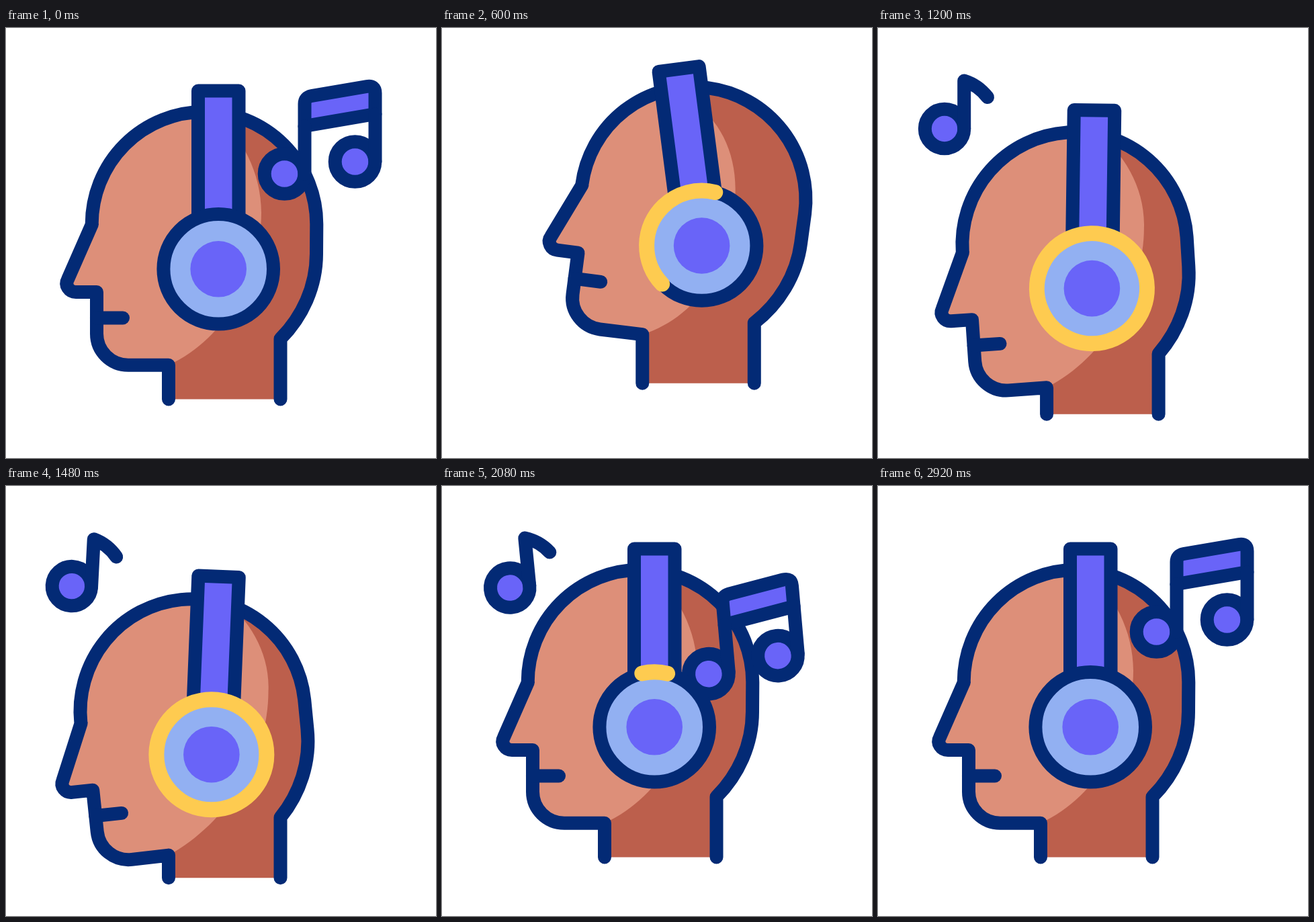
Animation, 640 px wide and 640 px high, one loop 3 s. Source, as an HTML page with a canvas:

```html
<!DOCTYPE html>
<html lang="en">
<head>
<meta charset="utf-8">
<title>Listening to music</title>
<style>
html, body { margin: 0; width: 100%; height: 100%; overflow: hidden; background: #fff; }
canvas { display: block; width: 100vw; height: 100vh; }
</style>
</head>
<body>
<canvas id="stage" width="640" height="640"></canvas>
<script>
const ctx = document.getElementById('stage').getContext('2d');
const LOOP = 3000, STEP = 40, TAU = Math.PI * 2, DEG = Math.PI / 180;
const NAVY = '#032a75', PURPLE = '#6964f8', BLUE = '#92b0f2', YELLOW = '#fecb50';
const SKIN = '#dd8f79', SHADE = '#bc5f4c';
const PIVOT = { x: 408.5, y: 462.6 };
const EAR = { x: 316.2, y: 358.8 };

const smooth = u => u * u * (3 - 2 * u);
const linear = u => u;

// Smooth start with a longer tail: cubic-bezier(.33, 0, .3, 1).
function settle(x) {
  let lo = 0, hi = 1;
  for (let i = 0; i < 24; i++) {
    const s = (lo + hi) / 2, r = 1 - s;
    if (0.99 * s * r * r + 0.9 * s * s * r + s ** 3 < x) lo = s; else hi = s;
  }
  return smooth(lo);
}

const span = (t, from, to, ease = smooth) => ease(Math.min(1, Math.max(0, (t - from) / (to - from))));

// Interpolates keys of the form [time, value, value, ...].
function track(t, keys, ease = smooth) {
  if (t <= keys[0][0]) return keys[0].slice(1);
  for (let i = 1; i < keys.length; i++) {
    const a = keys[i - 1], b = keys[i];
    if (t <= b[0]) {
      const p = span(t, a[0], b[0], ease);
      return a.slice(1).map((v, k) => v + (b[k + 1] - v) * p);
    }
  }
  return keys[keys.length - 1].slice(1);
}

const headKeys = [
  [245, 0, 0, 0, 0], [752, 61, -25.8, 8, -8], [872, 61, -25.8, 8, -8],
  [1416, 0, 30.7, -6, 2.3], [1551, 0, 30.7, -6, 2.3], [2029, 0, 0, 0, 0]
];
const singleSwing = [[500, 0], [840, -8], [900, -8], [1200, 0], [1480, 3], [1760, 0], [2080, -5.6], [2400, 0]];
const pairSwing = [[1780, 0], [2080, -5], [2360, 4], [2640, -5], [2900, 0]];
const ringTurn = [[320, 100], [400, 110], [880, 172.4], [1760, 249.8], [2080, 283.7], [2190, 295]];

function stroke(color = NAVY, width = 20) {
  ctx.strokeStyle = color;
  ctx.lineWidth = width;
  ctx.stroke();
}

function disc(x, y, r, fill, outlined) {
  ctx.beginPath();
  ctx.arc(x, y, r, 0, TAU);
  ctx.fillStyle = fill;
  ctx.fill();
  if (outlined) stroke();
}

function drawHead([dx, dy, angle]) {
  const c = Math.cos(angle * DEG), s = Math.sin(angle * DEG);
  const turn = (x, y) => {
    x -= PIVOT.x; y -= PIVOT.y;
    return [PIVOT.x + dx + x * c - y * s, PIVOT.y + dy + x * s + y * c];
  };
  const neckX = 242 + dx, chinY = turn(242, 501.7)[1], bottom = 552.5 + dy;
  const line = (x, y) => ctx.lineTo(...turn(x, y));
  const curve = (x1, y1, x2, y2, x, y) =>
    ctx.bezierCurveTo(...turn(x1, y1), ...turn(x2, y2), ...turn(x, y));

  const outlinePath = () => {
    ctx.beginPath();
    ctx.moveTo(neckX, bottom);
    ctx.lineTo(neckX, chinY);
    line(182, 501.7);
    curve(156, 501.7, 135, 481, 135, 455);
    line(135, 393);
    line(104, 393);
    curve(94, 393, 87, 383, 92, 374);
    line(128, 292);
    const [cx, cy] = turn(295, 292);
    ctx.arc(cx, cy, 167.3, Math.PI + angle * DEG, TAU + angle * DEG);
    line(462, 336);
    curve(462, 385, 441, 430, PIVOT.x, PIVOT.y);
    ctx.lineTo(PIVOT.x + dx, bottom);
  };

  ctx.save();
  outlinePath();
  ctx.fillStyle = SHADE;
  ctx.fill();
  ctx.clip();

  // The shadow edge follows the head but swells a little as it tilts.
  const tilt = Math.abs(angle), nod = Math.max(0, -angle);
  const bulge = 380 + dx + 1.75 * nod;
  ctx.beginPath();
  ctx.moveTo(0, 0);
  ctx.lineTo(312 + dx, 0);
  ctx.lineTo(312 + dx, 130 + dy);
  ctx.bezierCurveTo(350 + dx + 1.3 * tilt, 160 + dy, bulge + 0.5 * tilt, 215 + dy, bulge, 275 + dy);
  ctx.bezierCurveTo(bulge, 360 + dy + 2 * nod, ...turn(330, 462), neckX, chinY);
  ctx.lineTo(neckX, 640);
  ctx.lineTo(0, 640);
  ctx.fillStyle = SKIN;
  ctx.fill();
  ctx.restore();

  outlinePath();
  stroke();
  ctx.beginPath();
  ctx.moveTo(...turn(135, 431.5));
  line(174, 431.5);
  stroke();
  return turn(EAR.x, EAR.y);
}

function drawHeadphones([x, y], tilt, t) {
  ctx.save();
  ctx.translate(x, y);
  ctx.save();
  ctx.rotate(tilt * DEG);
  ctx.beginPath();
  ctx.rect(-30.2, -265.2, 60.5, 220);
  ctx.fillStyle = PURPLE;
  ctx.fill();
  stroke();
  ctx.restore();
  disc(0, 0, 81.8, BLUE, true);
  disc(0, 0, 41.8, PURPLE);

  const [turn] = track(t, ringTurn, linear);
  const grown = 360 * span(t, 320, 955);
  const left = 360 * (1 - span(t, 1530, 2190));
  const sweep = Math.min(grown, left);
  if (sweep > 0.1) {
    const tail = t < 1200 ? turn : turn - left;
    ctx.beginPath();
    ctx.arc(0, 0, 82, tail * DEG, (tail + sweep) * DEG);
    stroke(YELLOW, 23);
  }
  ctx.restore();
}

// Moves a note along a bent path from its home (away = 0) to the ear cup (away = 1),
// shrinking it as it slips behind.
function placeNote({ x, y, bend, hideFrom, draw }, away, angle) {
  const scale = 1 - span(away, hideFrom, hideFrom + 0.35, linear);
  if (scale < 0.01) return;
  ctx.save();
  ctx.translate(x + (EAR.x - x) * away ** bend, y + (EAR.y - y) * away);
  ctx.rotate(angle * DEG);
  ctx.scale(scale, scale);
  draw();
  ctx.restore();
}

function drawPair() {
  ctx.beginPath();
  ctx.moveTo(-22.5, -17);
  ctx.lineTo(-22.5, -50);
  ctx.quadraticCurveTo(-22.5, -60, -12, -62);
  ctx.lineTo(70, -76);
  ctx.quadraticCurveTo(82.5, -78, 82.5, -66);
  ctx.lineTo(82.5, -35);
  ctx.closePath();
  ctx.fillStyle = PURPLE;
  ctx.fill();
  stroke();
  disc(-52.5, 54, 29.8, PURPLE, true);
  disc(52.5, 36, 29.8, PURPLE, true);
  ctx.beginPath();
  ctx.moveTo(-22.5, 54);
  ctx.lineTo(-22.5, -17);
  ctx.moveTo(82.5, 36);
  ctx.lineTo(82.5, -35);
  stroke();
}

function drawSingle() {
  disc(-17, 22, 29.2, PURPLE, true);
  ctx.beginPath();
  ctx.moveTo(12.2, 22);
  ctx.lineTo(12.2, -49.5);
  ctx.quadraticCurveTo(33, -43, 47, -25);
  stroke();
}

const pair = { x: 467, y: 163, bend: 1.57, hideFrom: 0.5, draw: drawPair };
const single = { x: 116, y: 128, bend: 1.3, hideFrom: 0.45, draw: drawSingle };

function render(t) {
  ctx.fillStyle = '#fff';
  ctx.fillRect(0, 0, 640, 640);
  ctx.lineCap = ctx.lineJoin = 'round';
  const pose = track(t, headKeys, settle);
  const ear = drawHead(pose);
  const pairAway = t < 1200 ? span(t, 140, 660) : 1 - span(t, 1780, 2250);
  const singleAway = t < 1200 ? 1 - span(t, 500, 938) : span(t, 2150, 2663);
  placeNote(pair, pairAway, track(t, pairSwing)[0]);
  placeNote(single, singleAway, track(t, singleSwing)[0]);
  drawHeadphones(ear, pose[3], t);
}

const start = performance.now();
function tick() {
  const t = (performance.now() - start) % LOOP;
  render(Math.floor(t / STEP) * STEP);
  requestAnimationFrame(tick);
}
tick();
</script>
</body>
</html>
```
